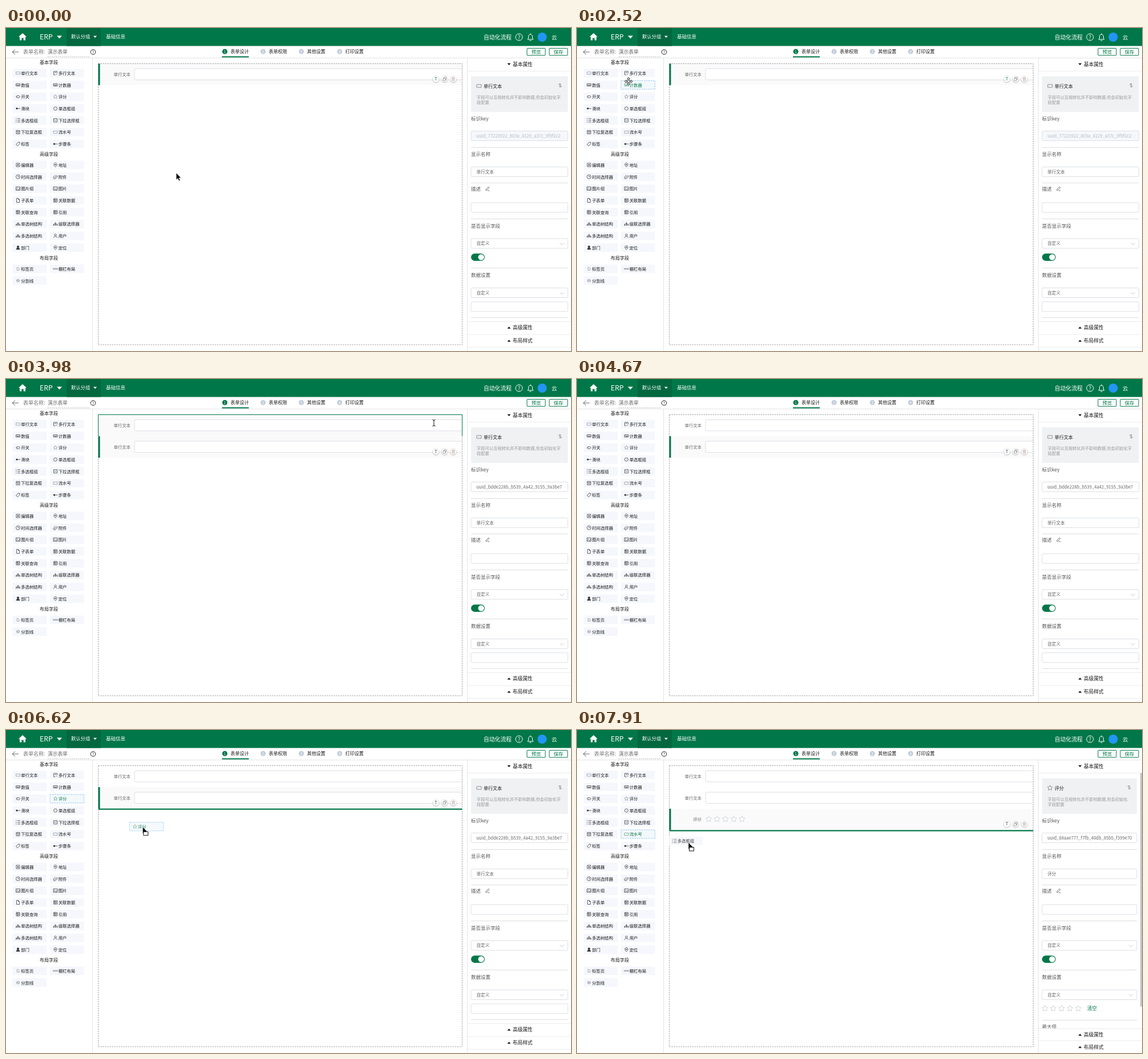
Animation, 989 px wide and 566 px high, one loop 8 s. Source, as an HTML page:

```html
<!DOCTYPE html>
<html lang="zh-CN">
<head>
<meta charset="utf-8">
<title>表单设计</title>
<style>
html, body { margin: 0; width: 100%; height: 100%; overflow: hidden; background: #fff; }
svg { display: block; width: 989px; height: 566px; font-family: "Noto Sans CJK SC", "Noto Sans CJK", "Noto Sans", sans-serif; }
</style>
</head>
<body>
<svg id="stage" viewBox="0 0 989 566">
  <g id="page"></g><g id="palette"></g><g id="form"></g><g id="props"></g><g id="pointer"></g>
</svg>
<script>
const GREEN = '#007748', DARK = '#1a1a1a', GREY = '#666', LINE = '#dcdfe6', PALE = '#fafafb';

// ---- drawing helpers ----
const rect = (x, y, w, h, fill = 'none', stroke = 'none', more = '') =>
  `<rect x="${x}" y="${y}" width="${w}" height="${h}" fill="${fill}" stroke="${stroke}" ${more}/>`;
const line = (x1, y1, x2, y2, color, more = '') =>
  `<path d="M${x1} ${y1}L${x2} ${y2}" stroke="${color}" ${more}/>`;
const circle = (x, y, r, fill = 'none', stroke = 'none', more = '') =>
  `<circle cx="${x}" cy="${y}" r="${r}" fill="${fill}" stroke="${stroke}" ${more}/>`;
const path = (x, y, d, fill = 'none', stroke = 'none', width = .8) =>
  `<path transform="translate(${x} ${y})" d="${d}" fill="${fill}" stroke="${stroke}" stroke-width="${width}"/>`;
const text = (x, cy, s, size = 8, fill = DARK, anchor = 'start', more = '') =>
  `<text x="${x}" y="${cy + size * .37}" font-size="${size}" fill="${fill}" text-anchor="${anchor}" ${more}>${s}</text>`;
const triangle = (x, y, w, h, fill) => path(x, y, `M${-w} ${-h / 2}H${w}L0 ${h / 2}z`, fill);
const help = (x, y, r, color) => circle(x, y, r, 'none', color) + text(x, y, '?', r * 1.6, color, 'middle');

const starPath = r => 'M' + Array.from({ length: 10 }, (_, i) => {
  const a = i * Math.PI / 5, d = i % 2 ? r * .5 : r;
  return (d * Math.sin(a)).toFixed(2) + ' ' + (-d * Math.cos(a)).toFixed(2);
}).join('L') + 'z';
const stars = (x, y) => [0, 1, 2, 3, 4].map(i => path(x + i * 14.6, y, starPath(5.4), '#fff', '#c3c9d4')).join('');

const icons = {
  text: 'M-3.5-2h7v4h-7z',
  area: 'M-3-3h6v3M-3-3v6h3M-1.5-1h3M1 2h2',
  num: 'M-3.5-2h7v4h-7zM-2-1v1M0-1v1M2-1v1M-2 1h4',
  toggle: 'M-1.3-1.8h2.6a1.8 1.8 0 0 1 0 3.6h-2.6a1.8 1.8 0 0 1 0-3.6zM-1.5-.5v1',
  star: starPath(3.6),
  slider: 'M-4 0h8M-3-1h2v2h-2z',
  radio: 'M-3 0a3 3 0 1 0 6 0a3 3 0 1 0-6 0z',
  list: 'M-4-3h1.5M-1-3h5M-4 0h1.5M-1 0h5M-4 3h1.5M-1 3h5',
  select: 'M-3-3h6v6h-6zM-1.5-1l1.5 1.5L1.5-1',
  multi: 'M-3-3h6v6h-6zM-3-1h6M-1.5 1h3',
  tag: 'M-3.5 1L0-3h3v3L-.5 3.5z',
  edit: 'M-3-3h6v6h-6zM-1.5 1.5L0-1.5L1.5 1.5M-1 .5h2',
  pin: 'M0 3.5C-5-1-2-3.5 0-3.5S5-1 0 3.5zM-1-1h2v1h-2z',
  clock: 'M-3.5 0a3.5 3.5 0 1 0 7 0a3.5 3.5 0 1 0-7 0zM0-2v2h2',
  clip: 'M-2 2.5L2-2A1.5 1.5 0 0 1 3.5 0L0 3A2 2 0 0 1-3 0L0-3',
  image: 'M-3.5-3h7v6h-7zM-3 2L-1 0L1 2L3-1M-2-1.5h1',
  doc: 'M-2.5-3.5h3l2 2v5h-5zM.5-3.5v2h2',
  page: 'M-1.7-2.5h2.2l1.3 1.3v3.7h-3.5z',
  table: 'M-3-3h6v6h-6zM-3-1h6M-1 1h3M-1-3v6',
  tree: 'M-.5-2.5h1v1h-1zM0-1.5V2M-3 2V0H3V2M-3.5 1.5h1v1h-1zM-.5 1.5h1v1h-1zM2.5 1.5h1v1h-1z',
  user: 'M-1.7-1.5a1.7 1.7 0 1 0 3.4 0a1.7 1.7 0 1 0-3.4 0zM-3 3.5C-3-.3 3-.3 3 3.5',
  group: 'M-1.7-1.5a1.7 1.7 0 1 0 3.4 0a1.7 1.7 0 1 0-3.4 0zM-3 3C-3-.3 3-.3 3 3z',
  grid: 'M-4-1h2v2h-2zM-1-1h2v2h-2zM2-1h2v2h-2z',
  rule: 'M-3 0h6M-2-2h4v4h-4z'
};
const faint = ['text', 'grid', 'rule', 'star', 'page'], solid = ['slider', 'group'];
const icon = (name, x, y, color) => {
  color = color || (faint.includes(name) ? '#8a919b' : '#333');
  return path(x, y, icons[name], solid.includes(name) ? color : 'none', color, .75);
};

// ---- palette ----
const sections = [
  ['基本字段', 60.5, 79, '单行文本 text 多行文本 area 数值 num 计数器 num 开关 toggle 评分 star 滑块 slider 单选框组 radio 多选框组 list 下拉选择框 select 下拉复选框 multi 流水号 text 标签 tag 步骤条 slider'],
  ['高级字段', 221.5, 240, '编辑器 edit 地址 pin 时间选择器 clock 附件 clip 图片组 image 图片 image 子表单 doc 关联数据 table 关联查询 table 引用 table 单选树结构 tree 级联选择器 tree 多选树结构 tree 用户 user 部门 group 定位 pin'],
  ['布局字段', 403.5, 422, '标签页 page 栅栏布局 grid 分割线 rule']
];
const items = sections.flatMap(([, , top, words]) => {
  const w = words.split(' ');
  return w.filter((_, i) => i % 2 == 0).map((name, i) =>
    ({ name, icon: w[i * 2 + 1], x: i % 2 ? 77 : 11.5, y: top + (i >> 1) * 20.7 - 7.5 }));
});
const drawItem = ({ name, icon: i, x, y }, on) =>
  rect(x, y, 59.5, 15, on ? '#f3f8fb' : '#f5f7fc', on ? '#85bff5' : 'none', 'stroke-dasharray="2.5 1.5" stroke-width=".9"') +
  icon(i, x + 9.5, y + 7.5, on ? '#5e9c83' : '') + text(x + 14.7, y + 7.6, name, 7.4, on ? GREEN : DARK);
const drawPalette = hover => sections.map(s => text(75, s[1], s[0], 8, DARK, 'middle')).join('') +
  items.map((it, i) => drawItem(it, i == hover)).join('');

// ---- fixed page parts ----
const drawPage = () => {
  let s = rect(0, 0, 989, 566, '#fff') + rect(0, 0, 989, 31.5, GREEN) + rect(106, 0, 60, 31.5, '#04683f') +
    path(29, 15.5, 'M-7 0L0-6.5L7 0H5V6H1.7V2H-1.7V6H-5V0z', '#fff') +
    text(59, 15.5, 'ERP', 12.2, '#fff') + triangle(93.5, 16, 4.5, 5, '#fff') +
    text(114, 15, '默认分组', 8.3, '#fff', 'start', 'font-weight="500"') + triangle(156, 15.5, 3, 3.5, '#fff') +
    text(175, 15, '基础信息', 8.5, '#fff', 'start', 'font-weight="500"') +
    text(836, 16, '自动化流程', 9.8, '#fff') + help(898, 16, 6, '#fff') +
    path(918, 16, 'M-5 4H5L3.5 2V-1C3.5-6-3.5-6-3.5-1V2zM-1.5 6h3M0-5v-1.5', 'none', '#fff', 1) +
    circle(938.5, 16, 8, '#2196f3') + text(955, 16, '云', 9.5, '#fff');
  s += line(0, 52.5, 989, 52.5, '#e2e4e6') + path(16, 42, 'M6 0H-5M0-4.5L-5 0L0 4.5', 'none', '#555', .9) +
    text(30, 42, '表单名称:', 9, '#777') + text(73, 42, '演示表单', 8.7, GREY) +
    line(73, 50.5, 147, 50.5, '#bbb', 'stroke-dasharray="2 1.5"') + help(152.5, 42, 4.3, '#222');
  ['表单设计', '表单权限', '其他设置', '打印设置'].forEach((name, i) => {
    const x = 383 + i * 67;
    s += circle(x, 41.3, 4.5, i ? '#c3cedb' : GREEN) + text(x, 41.3, i + 1, 6, '#fff', 'middle') + text(x + 10, 41.3, name, 8);
  });
  s += rect(378, 49.5, 47, 2, GREEN);
  [['预览', 912], ['保存', 951]].forEach(([name, x]) =>
    s += rect(x, 35.5, 32, 12.5, '#fff', GREEN, 'rx="1"') + text(x + 16, 41.8, name, 8.4, GREEN, 'middle'));
  return s + line(151.5, 53, 151.5, 566, '#e4e5e8') + line(807.5, 53, 807.5, 566, '#e4e5e8');
};

// ---- form area ----
const PITCH = 37.7, rowTop = i => 62.5 + i * PITCH;
const drawForm = (count, hoverRow, inserting) => {
  let s = '';
  for (let i = 0; i < count; i++) {
    const y = rowTop(i), cy = y + 18.6, last = i == count - 1;
    if (last || i == hoverRow) s += rect(162, y, 636.5, PITCH, PALE);
    s += text(218, cy, i == 2 ? '评分' : '单行文本', 7.4, GREY, 'end');
    s += i == 2 ? stars(230.5, cy - .3)
      : `<path d="M798 ${cy - 9.8}H227q-2 0-2 2v15.6q0 2 2 2H798" fill="#fff" stroke="${LINE}"/>`;
  }
  s += rect(161.5, 62.5, 637, 492.5, 'none', '#999', 'stroke-dasharray="2.5 1.5" stroke-width=".9"');
  const y = rowTop(count - 1), by = y + 26.8;
  s += rect(161.5, y, 3, PITCH, GREEN);
  // the next row covers the lower edge of the hover frame
  if (hoverRow >= 0 && hoverRow < count - 1)
    s += path(161.5, rowTop(hoverRow), `M0 ${PITCH}V0H637V${PITCH}`, 'none', GREEN, 1);
  [752.5, 767.7, 783].forEach(x => s += circle(x, by + 1, 6.2, '#00000022') + circle(x, by, 5.6, '#fff', '#ccc', 'stroke-width=".5"'));
  s += text(752.5, by, 'T', 7.5, count < 2 ? GREEN : '#345', 'middle', 'font-weight="500"') +
    path(767.7, by, 'M-2.5-1h4v4h-4zM-1-1v-2h4v4H1.5', 'none', '#777', .7) +
    path(783, by, 'M-3-2h6M-1-3h2M-2-2v5h4v-5M-.6-.5v2M.6-.5v2', 'none', '#b59a88', .7);
  if (inserting) s += rect(162, y + PITCH - .3, 636.5, 2.2, GREEN);
  return s;
};

// ---- properties panel ----
const keys = ['uuid_77223922_803a_4129_a37c_9f9f1c2', 'uuid_bdde228b_b539_4a42_9155_9a3be7', 'uuid_88aae777_f7fb_40db_85b5_f399e70'];
const drawProps = count => {
  const rating = count == 3, right = rating ? 980 : 983.5, w = right - 814, name = rating ? '评分' : '单行文本';
  const field = (y, value = '', color = GREY, fill = '#fff') => rect(814, y, w, 17, fill, LINE, 'rx="2"') + text(823.5, y + 8.6, value, 7.6, color);
  const select = y => field(y, '自定义') + path(right - 10.5, y + 9, 'M-3.5-1.5L0 2L3.5-1.5', 'none', '#b8bdc6');
  const label = (y, s) => text(814, y, s, 8.5, '#555');
  const split = y => line(814, y, right, y, '#dedede');
  const head = (y, s, up) => triangle(880.5, y, 3, up ? -3.5 : 3.5, DARK) + text(887, y, s, 8.7);
  const hint = '字段可以互相转化并不影响数据,但会初始化字段配置', cut = rating ? 20 : 21;
  let s = head(63.5, '基本属性') + line(808, 75.5, 989, 75.5, '#ececec') +
    rect(814, 84.5, w, 62.5, '#f0f1f2') + (rating ? path(828, 101.5, starPath(4.6), 'none', '#777') : path(828, 101.5, 'M-4-2.5h8v5h-8z', 'none', '#777')) +
    text(836, 102, name, 8) + path(right - 13.5, 100.5, 'M-3-1L-.7-3.5V3.5M3 1L.7 3.5V-3.5', 'none', '#888') +
    text(824, 121, hint.slice(0, cut), 7.25, '#999') + text(824, 130.2, hint.slice(cut), 7.25, '#999') +
    label(158.5, '标识key') +
    field(180.5, keys[count - 1], count == 1 ? '#b6bac2' : GREY, count == 1 ? '#f5f7fa' : '#fff') + split(209.5) +
    label(221, '显示名称') + field(243.5, name) + split(271.5) +
    label(281.5, '描述') + path(843, 281.5, 'M-3 1.5L1.5-3.5L3-2L-1.5 3H-3zM0 3.5h3.5', 'none', '#555') + field(306, '') + split(334.5) +
    label(346.5, '是否显示字段') + select(369) + rect(814, 395.3, 24, 12.6, GREEN, 'none', 'rx="6.3"') + circle(831.7, 401.6, 5.2, '#fff') + split(420.5) +
    label(433, '数据设置') + select(455.5);
  if (rating) {
    s += stars(819, 488) + text(893, 488, '清空', 8.6, GREEN) + split(508.5) + label(520, '最大值') + rect(808.5, 522.5, 180, 43.5, '#fff');
    s += rect(986, 75, 3, 410, '#c1c4c8', 'none', 'rx="1.5"');
  } else s += field(479.8) + split(507.5);
  const [a, b] = rating ? [534, 555.5] : [525, 548];
  for (const y of rating ? [523.5, 544.5] : [514.5, 537, 559.5]) s += line(808, y, 989, y, '#ececec');
  return s + head(a, '高级属性', true) + head(b, '布局样式', true);
};

// ---- pointer ----
const arrow = 'M0 0V12L2.8 9.5L4.8 14L6.8 13.1L4.8 8.8H8.4z';
const fourWay = 'M0-7L2.3-4.3H1V-1H4.3V-2.3L7 0L4.3 2.3V1H1V4.3H2.3L0 7L-2.3 4.3H-1V1H-4.3V2.3L-7 0L-4.3-2.3V-1H-1V-4.3H-2.3z';
const drawPointer = (x, y, kind) => {
  if (kind == 'move') return path(x, y, fourWay, '#fff', '#111', .9);
  if (kind == 'text') return path(x, y, 'M-2.5-5.5Q0-5.5 0-4Q0-5.5 2.5-5.5M0-4.5V4.5M-2.5 5.5Q0 5.5 0 4Q0 5.5 2.5 5.5', 'none', '#111', 1);
  return path(x, y, arrow, '#000', '#fff', .6) + (kind == 'drag' ? path(x, y, 'M1.5 8.5h8v6.5h-8z', '#fff', '#111', 1) : '');
};

// ---- timeline ----
// bursts of stepped movement: start, end, number of steps
const bursts = [[1290, 1830, 7], [1990, 1990, 1], [2210, 2740, 8], [3060, 3220, 3], [3450, 4220, 11], [4300, 4670, 6],
  [5440, 6230, 11], [6310, 7050, 9], [7140, 7540, 6], [7750, 7910, 3]];
// pointer path: time, x, y
const route = [[0, 298, 254], [1200, 298, 254], [1740, 203, 124], [1830, 210, 120], [1990, 210, 119], [2130, 210, 119],
  [2520, 88, 93], [2740, 45, 81], [2980, 45, 81], [3060, 120, 115], [3140, 228, 160], [3220, 275, 177], [3450, 275, 177],
  [3900, 735, 64], [3980, 749, 77], [3995, 749, 77], [4220, 728, 336], [4670, 956, 570], [5360, 956, 570], [5914, 163, 173],
  [6230, 100, 119], [6310, 115, 126], [6402, 180, 150], [6590, 240, 170], [6680, 240, 170], [7050, 136, 160],
  [7140, 125, 160], [7540, 45, 163], [7750, 107, 181], [7830, 160, 192], [7910, 195, 197], [8000, 195, 197]];
const drags = [
  { from: 3060, to: 3440, item: 0, hover: 0, dx: 33, dy: 10 },
  { from: 6310, to: 6670, item: 5, hover: 5, dx: 23, dy: 8 },
  { from: 7750, to: 8000, item: 8, hover: 11, dx: 34, dy: 10 }
];
const stepped = t => {
  const b = bursts.filter(b => b[0] <= t).pop();
  if (!b) return 0;
  const [start, end, n] = b;
  if (t >= end) return end;
  const step = (end - start) / (n - 1);
  return start + Math.floor((t - start) / step + .15) * step;
};
const pointerAt = t => {
  const i = Math.max(1, route.findIndex(k => k[0] >= t)), [t0, x0, y0] = route[i - 1], [t1, x1, y1] = route[i];
  const p = (t - t0) / (t1 - t0);
  return [x0 + (x1 - x0) * p, y0 + (y1 - y0) * p];
};

const shown = {};
const put = (id, key, make) => {
  if (shown[id] === key) return;
  shown[id] = key;
  document.getElementById(id).innerHTML = make();
};
put('page', 0, drawPage);

function render() {
  const t = stepped(performance.now() % 8000), [x, y] = pointerAt(t);
  const count = t < 3449 ? 1 : t < 6675 ? 2 : 3;
  const drag = drags.find(d => t >= d.from && t < d.to);
  const over = items.findIndex(i => x >= i.x && x <= i.x + 59.5 && y >= i.y && y <= i.y + 15);
  const hover = drag ? drag.hover : over >= 0 && x < items[over].x + 58.5 ? over : -1;
  const row = !drag && x > 162 && x < 798 && y > 62 ? Math.floor((y - 62.5) / PITCH) : -1;
  const inInput = row >= 0 && row < Math.min(count, 2) && x > 225 && Math.abs(y - rowTop(row) - 18.6) < 10;
  const inserting = !!drag && x > 162;
  const kind = drag ? 'drag' : over >= 0 ? 'move' : inInput ? 'text' : 'arrow';

  put('palette', hover, () => drawPalette(hover));
  put('form', [count, row, inserting].join(), () => drawForm(count, row, inserting));
  put('props', count, () => drawProps(count));
  put('pointer', [x, y, kind].join(), () =>
    (drag ? `<g opacity=".85">${drawItem({ ...items[drag.item], x: x - drag.dx, y: y - drag.dy }, drag.hover == drag.item)}</g>` : '') +
    drawPointer(x, y, kind));
  requestAnimationFrame(render);
}
render();
</script>
</body>
</html>
```
